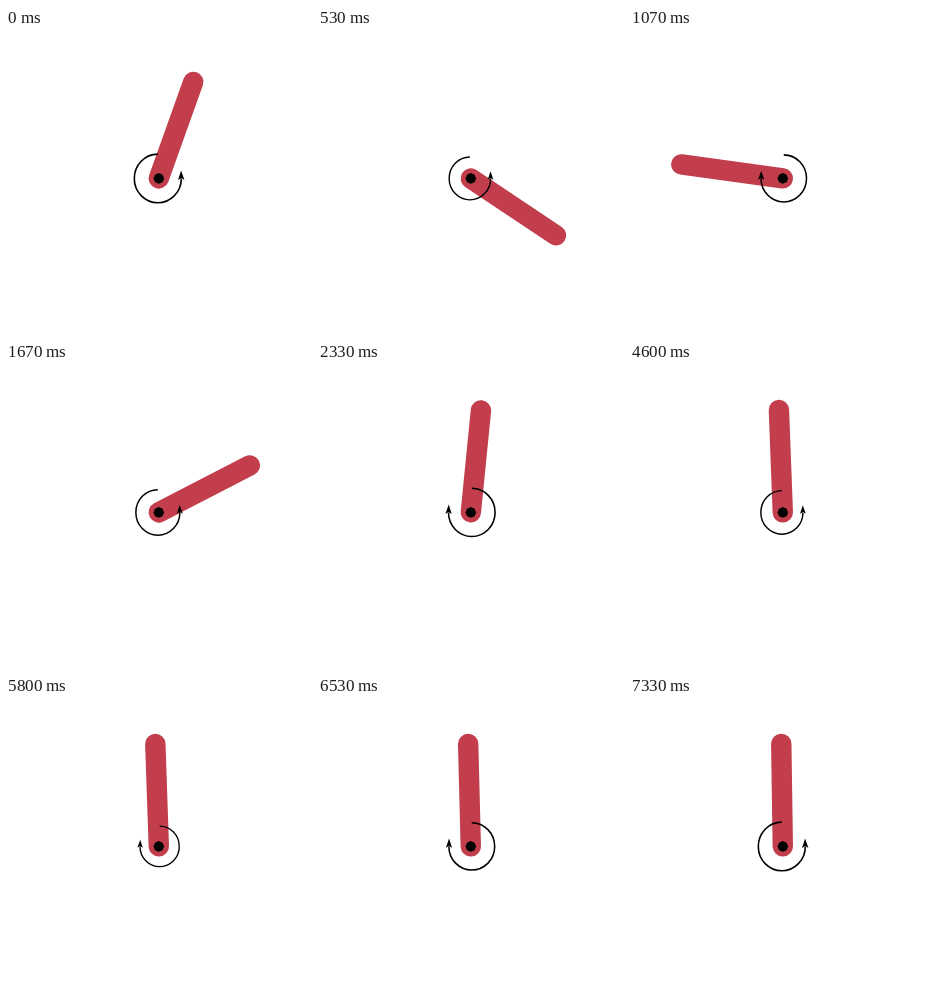
Recreate the animation shown at these times as an HTML page with a canvas. Size 306 by 306 pixels, loop 7390 ms.

```html
<!DOCTYPE html>
<html>
<head>
<meta charset="utf-8">
<title>Pendulum</title>
<style>
html, body { margin: 0; width: 100%; height: 100%; overflow: hidden; background: #fff }
canvas { display: block }
</style>
</head>
<body>
<canvas id="stage" width="306" height="306"></canvas>
<script>
const ctx = document.getElementById('stage').getContext('2d');
const LOOP = 7390, STEP = 200 / 3, LAST = 110, LENGTH = 102.5;

// Key poses: [step, clockwise angle from upright in radians].
const poses = [
  [0, .343], [4, .64], [8, 2.16], [11, 4.12], [14, 5.06], [16, 4.85], [20, 3.08],
  [25, 1.094], [31, .3], [37, .06], [48, .01], [69, -.038], [87, -.034], [LAST, -.015]
];

function slopeAt(i) {
  const [n0, a0] = poses[Math.max(i - 1, 0)];
  const [n1, a1] = poses[Math.min(i + 1, poses.length - 1)];
  return (a1 - a0) / (n1 - n0);
}

// Smooth cubic through the key poses.
function angleAt(n) {
  const i = Math.max(1, poses.findIndex(([step]) => step >= n));
  const [n0, a0] = poses[i - 1], [n1, a1] = poses[i];
  const span = n1 - n0, t = (n - n0) / span, r = 1 - t;
  return a0 * r * r * (1 + 2 * t) + a1 * t * t * (1 + 2 * r)
    + span * t * r * (slopeAt(i - 1) * r - slopeAt(i) * t);
}

// Nearly full torque that keeps changing sides; positive is counterclockwise.
function torqueAt(n) {
  const size = 1 - .2 * (63 * n % LAST) / LAST;
  return Math.cos(5 * Math.PI * n / 16) > 0 ? size : -size;
}

function drawRod(angle) {
  ctx.strokeStyle = '#c23e4c';
  ctx.lineWidth = 20.4;
  ctx.lineCap = 'round';
  ctx.beginPath();
  ctx.moveTo(0, 0);
  ctx.lineTo(LENGTH * Math.sin(angle), -LENGTH * Math.cos(angle));
  ctx.stroke();
}

function drawAxle() {
  ctx.fillStyle = '#000';
  ctx.beginPath();
  for (let a = 0; a < 2 * Math.PI; a += Math.PI / 4) ctx.lineTo(5.3 * Math.cos(a), 5.3 * Math.sin(a));
  ctx.fill();
}

function drawArrow(torque) {
  ctx.save();
  ctx.scale(torque, Math.abs(torque));
  ctx.strokeStyle = '#000';
  ctx.lineWidth = 1.6;
  ctx.lineCap = 'butt';
  ctx.beginPath();
  ctx.ellipse(-1, 0, 23.5, 24.3, 0, -Math.PI / 2, 0, true);
  ctx.stroke();
  ctx.beginPath();
  ctx.moveTo(22.3, -8);
  ctx.lineTo(25.6, 1.5);
  ctx.lineTo(22.5, -.5);
  ctx.lineTo(19.2, 1.5);
  ctx.fill();
  ctx.restore();
}

function draw(now) {
  const time = Math.floor(now % LOOP / 10) * 10;
  const n = Math.min(LAST, Math.floor((time + 4) / STEP));
  ctx.setTransform(1, 0, 0, 1, 0, 0);
  ctx.fillStyle = '#fff';
  ctx.fillRect(0, 0, 306, 306);
  ctx.translate(152.8, 150.4);
  drawRod(angleAt(n));
  drawAxle();
  drawArrow(torqueAt(n));
}

const start = performance.now();
function tick() {
  draw(performance.now() - start);
  requestAnimationFrame(tick);
}
tick();
</script>
</body>
</html>
```
